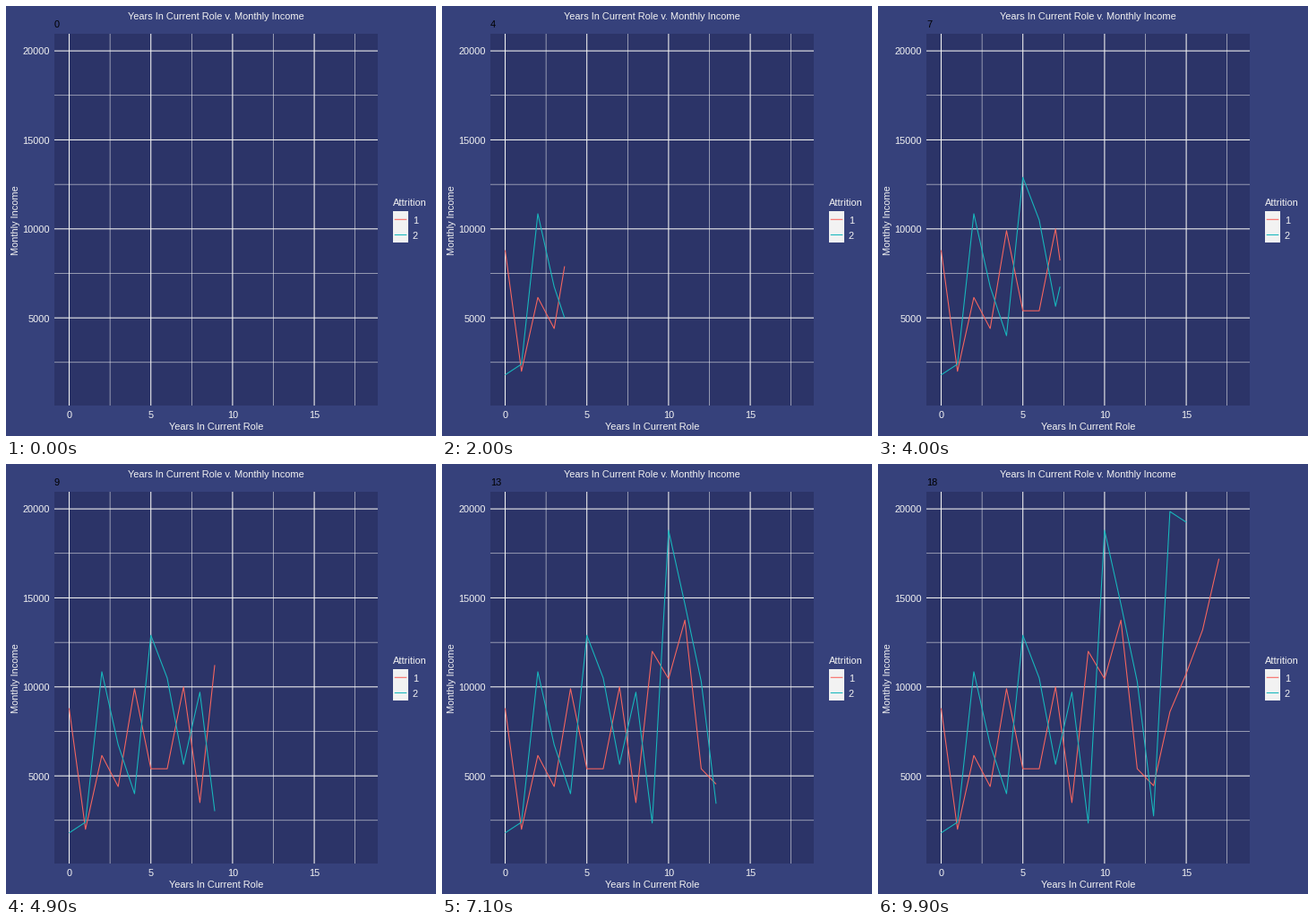
Write a matplotlib script that moves like this. It is 480 px wide and 480 px high and loops after 10 s.

```python
import matplotlib.pyplot as plt
import numpy as np
from matplotlib.animation import FuncAnimation
from matplotlib.patches import Rectangle

SIZE, DPI = 480, 72
FRAMES, STEP = 100, 100
LAST_YEAR = 18
BACK, PANEL, LIGHT = "#36417b", "#2c3468", "#f2f2f2"
RED, TEAL = "#f8665f", "#17b8bd"
LEFT, TOP, RIGHT, BOTTOM = 54, 31, 415, 446
THICK, THIN = 1.07, 0.53

# Corners of each line: income in thousands, one per year in role
CORNERS = {
    RED: [8.8, 2, 6.15, 4.4, 9.9, 5.4, 5.4, 10, 3.5, 12, 10.45, 13.75,
          5.4, 4.45, 8.6, 10.75, 13.2, 17.2, 17],
    TEAL: [1.8, 2.4, 10.85, 6.75, 4, 12.9, 10.5, 5.65, 9.7, 2.35, 18.8,
           14.65, 10.3, 2.75, 19.85, 19.25],
}

plt.rcParams["font.family"] = "Liberation Sans"
plt.rcParams["font.size"] = 11


def px(year):
    return 70.5 + 18.24 * year


def py(thousands):
    return 50.1 + 19.87 * (20 - thousands)


fig = plt.figure(figsize=(SIZE / DPI, SIZE / DPI), dpi=DPI, facecolor=BACK)
ax = fig.add_axes([0, 0, 1, 1])
ax.set_xlim(0, SIZE)
ax.set_ylim(SIZE, 0)
ax.axis("off")


def box(x, y, w, h, color):
    ax.add_patch(Rectangle((x, y), w, h, facecolor=color, linewidth=0))


def stroke(xs, ys, color=LIGHT, width=THICK, **kw):
    return ax.plot(xs, ys, color=color, lw=width, snap=False,
                   solid_capstyle="butt", solid_joinstyle="round", **kw)[0]


def label(x, y, text, color=LIGHT, **kw):
    return ax.text(x, y, text, color=color, **kw)


box(LEFT, TOP, RIGHT - LEFT, BOTTOM - TOP, PANEL)

# Thin lines first, so that the thick ones cross over them
for shift, width in ((2.5, THIN), (0, THICK)):
    for tick in range(0, 20, 5):
        stroke([px(tick + shift)] * 2, [TOP, BOTTOM], width=width)
        stroke([LEFT, RIGHT], [py(tick + 5 - shift)] * 2, width=width)

for tick in range(0, 20, 5):
    label(px(tick), 460, str(tick), ha="center")
    label(48.8, py(tick + 5) + 4.4, f"{tick + 5}000", ha="right")

label(234.8, 15, "Years In Current Role v. Monthly Income", ha="center")
label(234.5, 473, "Years In Current Role", ha="center")
label(16.3, 239, "Monthly Income", rotation=90, ha="right", va="center")

label(432, 223, "Attrition")
box(432, 229, 17, 35, LIGHT)
for row, color in enumerate(CORNERS):
    y = 238.3 + 17.2 * row
    stroke([433.7, 447.3], [y, y], color)
    label(454, y + 4.8, str(row + 1))

counter = label(54, 24, "0", color="black")
lines = {color: stroke([], [], color, zorder=3) for color in CORNERS}


def draw(frame):
    now = LAST_YEAR * frame / (FRAMES - 1)
    counter.set_text(str(round(now)))
    for color, line in lines.items():
        values = CORNERS[color]
        years = np.arange(len(values))
        passed = years[years < now]
        # The closing year drops out once the reveal is complete
        tip = [now] if 0 < now <= years[-1] and now < LAST_YEAR else []
        shown = np.append(passed, tip)
        line.set_data(px(shown), py(np.interp(shown, years, values)))
    return [counter, *lines.values()]


anim = FuncAnimation(fig, draw, frames=FRAMES, interval=STEP,
                     repeat=True, repeat_delay=0, blit=False)
plt.show()
```
